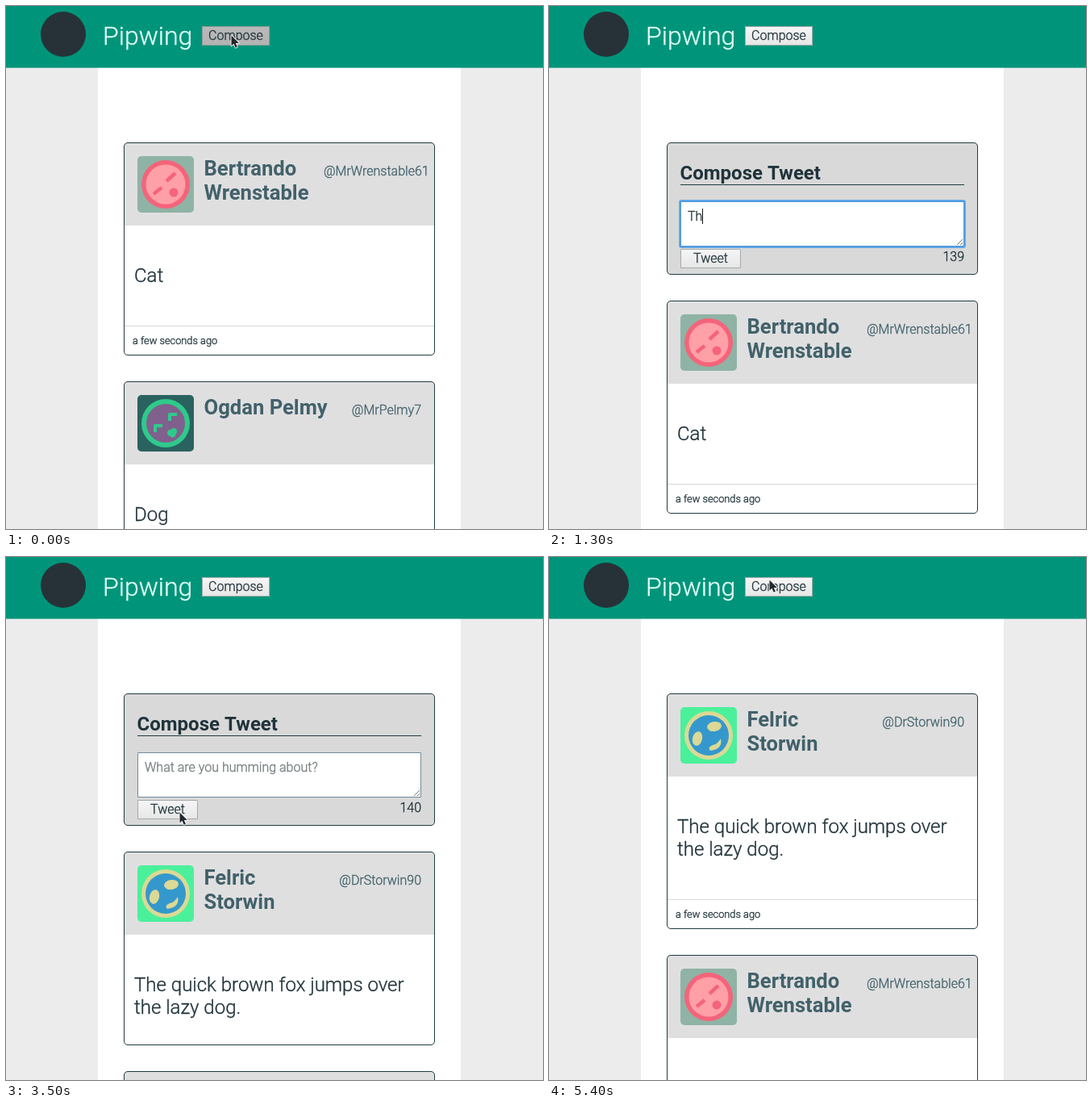
An HTML page with a canvas that plays this animation: 666 by 648 pixels, repeating every 5900 ms.

```html
<!DOCTYPE html>
<html lang="en">
<head>
<meta charset="utf-8">
<title>Compose and post</title>
<style>
  html, body { margin: 0; width: 100%; height: 100%; overflow: hidden; background: #ececec; }
  canvas { display: block; }
</style>
</head>
<body>
<canvas id="stage" width="666" height="648"></canvas>
<script>
const ctx = document.getElementById('stage').getContext('2d');
const LOOP = 5900, STEP = 100, LAST_STEP = 5400;
const SLIDE = 640, OPEN_AT = 35, POST_AT = 3037, CLOSE_AT = 4649;
const FOCUS_AT = 700, TYPE_AT = 1200, TYPED_AT = 2500, BLUR_AT = 2900;
const INK = '#20333a', DIM = '#42616a', EDGE = '#1f3c42';
const LEFT = 146, WIDTH = 386, GAP = 32, TOP = 169, COMPOSE_H = 164;
const MESSAGE = 'The quick brown fox jumps over the lazy dog.';

const cards = {
  fox: { avatar: globe, name: ['Felric', 'Storwin'], handle: '@DrStorwin90',
         body: ['The quick brown fox jumps over', 'the lazy dog.'], height: 292 },
  cat: { avatar: rose, name: ['Bertrando', 'Wrenstable'], handle: '@MrWrenstable61', handleX: 394,
         body: ['Cat'], height: 264 },
  dog: { avatar: emerald, name: ['Ogdan Pelmy'], handle: '@MrPelmy7',
         body: ['Dog'], height: 264 }
};

// time, x, y
const pointerPath = [
  [0, 279, 36], [2500, 279, 36], [2800, 220, 321], [3100, 215, 316],
  [3700, 215, 316], [4400, 273, 28], [LOOP, 273, 28]
];

const clamp = (v, lo, hi) => Math.min(hi, Math.max(lo, v));
const swing = u => 0.5 - Math.cos(Math.PI * clamp(u, 0, 1)) / 2;
const slide = (t, start) => swing((t - start) / SLIDE);

function text(str, x, y, size, color = INK, weight = 300, align = 'left') {
  ctx.font = `${weight} ${size}px Roboto, sans-serif`;
  ctx.fillStyle = ctx.strokeStyle = color;
  ctx.textAlign = align;
  ctx.fillText(str, x, y);
  // A hairline stroke gives light text the fuller look of smoothed type.
  if (weight === 300) {
    ctx.lineWidth = 0.35;
    ctx.lineJoin = 'round';
    ctx.strokeText(str, x, y);
  }
}

function rect(x, y, w, h, color) {
  ctx.fillStyle = color;
  ctx.fillRect(x, y, w, h);
}

function frame(x, y, w, h, color) {
  ctx.strokeStyle = color;
  ctx.lineWidth = 1;
  ctx.strokeRect(x + 0.5, y + 0.5, w - 1, h - 1);
}

function disc(x, y, rx, color, ry = rx, turn = 0) {
  ctx.fillStyle = color;
  ctx.beginPath();
  ctx.ellipse(x, y, rx, ry, turn, 0, Math.PI * 2);
  ctx.fill();
}

function polyline(points, color, width) {
  ctx.strokeStyle = color;
  ctx.lineWidth = width;
  ctx.beginPath();
  points.forEach(([x, y]) => ctx.lineTo(x, y));
  ctx.stroke();
}

function polygon(points, color) {
  ctx.fillStyle = color;
  ctx.beginPath();
  points.forEach(([x, y]) => ctx.lineTo(x, y));
  ctx.closePath();
  ctx.fill();
}

function rounded(x, y, w, h, r) {
  ctx.beginPath();
  ctx.roundRect(x, y, w, h, r);
}

// A rounded, outlined box whose content is clipped to its current height.
function panel(y, h, fill, content) {
  if (h < 1) return;
  ctx.save();
  rounded(LEFT, y, WIDTH, h, 5);
  ctx.clip();
  rect(LEFT, y, WIDTH, h, fill);
  content();
  ctx.restore();
  rounded(LEFT + 0.5, y + 0.5, WIDTH - 1, h - 1, 4.5);
  ctx.strokeStyle = EDGE;
  ctx.lineWidth = 1;
  ctx.stroke();
}

function badge(back, ring, inner, innerRadius) {
  ctx.fillStyle = back;
  rounded(-35, -35, 70, 70, 5);
  ctx.fill();
  disc(0, 0, 30, ring);
  disc(0, 0, innerRadius, inner);
}

function rose() {
  const pink = '#f4647b';
  badge('#8fb3a5', pink, '#ff9fa6', 24.5);
  polyline([[1, -4], [12, -14]], pink, 4.5);
  polyline([[-15, 12], [-5, 4]], pink, 4.5);
  disc(10, 10, 5.5, pink);
}

function emerald() {
  const green = '#2fca8b';
  badge('#2a625f', green, '#80608c', 24);
  polyline([[5, -3], [5, -11], [14, -11]], green, 4);
  polyline([[-13, 11], [-13, 3], [-4, 3]], green, 4);
  disc(6, 12, 4, green);
  disc(10, 10, 4, green);
  polygon([[3, 14], [13, 8], [12, 16], [8, 18]], green);
}

function globe() {
  const cream = '#dbd995';
  badge('#4bf09b', cream, '#3598cc', 25);
  disc(7, -11, 9, cream, 6, -0.15);
  disc(-14, 4, 6, cream, 9, 0.25);
  ctx.fillStyle = cream;
  ctx.beginPath();
  ctx.moveTo(15, 4);
  ctx.quadraticCurveTo(18, 17, 2, 19);
  ctx.quadraticCurveTo(-2, 15, 5, 12);
  ctx.quadraticCurveTo(11, 11, 15, 4);
  ctx.fill();
}

function drawCard(card, y, h = card.height) {
  panel(y, h, '#fff', () => {
    rect(LEFT, y, WIDTH, 103, '#dfdfe0');
    ctx.save();
    ctx.translate(198, y + 52);
    card.avatar();
    ctx.restore();
    card.name.forEach((line, i) => text(line, 245.5, y + 41 + i * 30, 25.6, DIM, 700));
    if (card.handleX) text(card.handle, card.handleX, y + 41, 16, DIM);
    else text(card.handle, 515, y + 41, 16, DIM, 300, 'right');
    card.body.forEach((line, i) => text(line, 159, y + 173 + i * 28, 24));
    rect(LEFT, y + card.height - 37, WIDTH, 1, '#d5d9da');
    text('a few seconds ago', 157, y + card.height - 14, 12.8);
  });
  return y + h + GAP;
}

function drawButton(label, x, y, w, h, pressed) {
  const shade = ctx.createLinearGradient(0, y, 0, y + h);
  shade.addColorStop(0, pressed ? '#b9b9b9' : '#f6f6f6');
  shade.addColorStop(1, pressed ? '#b3b3b3' : '#e6e6e6');
  rect(x, y, w, h, shade);
  frame(x, y, w, h, pressed ? '#8f9c98' : '#a3aaab');
  text(label, x + w / 2, y + 17, 16, INK, 300, 'center');
}

function drawField(t, y) {
  const count = t < TYPE_AT || t >= POST_AT ? 0
    : clamp(Math.round(2 + (t - 1300) * 0.035), 1, MESSAGE.length);
  const focused = t >= FOCUS_AT && t < BLUR_AT;
  const typed = MESSAGE.slice(0, count);

  rect(163, y, 352, 56, '#fff');
  frame(163, y, 352, 56, '#718a99');
  if (focused) {
    ctx.strokeStyle = '#4d9fe9';
    ctx.lineWidth = 2.5;
    rounded(162.5, y - 0.5, 353, 57, 1.5);
    ctx.stroke();
  }
  polyline([[506, y + 54], [513, y + 47]], '#777', 1);
  polyline([[510, y + 54], [513, y + 51]], '#777', 1);

  text(typed || 'What are you humming about?', 172, y + 24, 16, typed ? INK : '#747b7e');
  if (focused && t < TYPED_AT + 200) {
    const caret = 172 + (typed ? ctx.measureText(typed).width : 0);
    rect(Math.round(caret), y + 9, 1, 19, '#111');
  }
  // The counter trails the text by one key while typing.
  const counted = t < TYPED_AT ? Math.max(0, count - 1) : count;
  text(140 - counted, 515, y + 74, 16, INK, 300, 'right');
}

function drawCompose(t, open) {
  const y = Math.floor(TOP - GAP * (1 - open));
  const inner = y - Math.round(3.2 * (1 - open));
  panel(y, Math.round(COMPOSE_H * open), '#d9d9d9', () => {
    text('Compose Tweet', 162.5, inner + 46, 24, '#20333a', 700);
    rect(163, inner + 52, 352, 1, EDGE);
    drawField(t, inner + 73);
    drawButton('Tweet', 163, inner + 132, 75, 24, t >= BLUR_AT && t < POST_AT);
  });
}

function drawPointer(t) {
  if (t >= TYPE_AT && t <= TYPED_AT) return;
  const i = pointerPath.findIndex(p => p[0] > t);
  const [t0, x0, y0] = pointerPath[i - 1], [t1, x1, y1] = pointerPath[i];
  const u = swing((t - t0) / (t1 - t0));
  ctx.save();
  ctx.translate(x0 + (x1 - x0) * u, y0 + (y1 - y0) * u);
  const arrow = [[0.5, 0.5], [0.5, 13.5], [3.5, 10.8], [5.6, 15.8], [7.9, 14.8], [5.8, 9.9], [9.9, 9.9]];
  ctx.lineJoin = 'round';
  polyline([...arrow, arrow[0]], '#fff', 1.6);
  polygon(arrow, '#22292c');
  ctx.restore();
}

function drawHeader(t) {
  rect(0, 0, 666, 76.6, '#00957a');
  disc(71, 35, 28, '#263238');
  text('Pipwing', 120, 48, 32, '#e4fff9');
  drawButton('Compose', 243, 25, 84, 24, t < OPEN_AT || (t >= 4500 && t < CLOSE_AT));
}

function draw(t) {
  rect(0, 0, 666, 648, '#ececec');
  rect(114, 76, 450, 572, '#fff');

  const open = slide(t, OPEN_AT) - slide(t, CLOSE_AT);
  drawCompose(t, open);
  let y = Math.round(TOP + (COMPOSE_H + GAP) * open);
  const grown = slide(t, POST_AT);
  if (grown > 0) y = drawCard(cards.fox, y, Math.round(cards.fox.height * grown));
  y = drawCard(cards.cat, y);
  drawCard(cards.dog, y);

  drawHeader(t);
  drawPointer(t);
}

function tick() {
  const t = performance.now() % LOOP;
  draw(Math.min(LAST_STEP, Math.floor(t / STEP) * STEP));
  requestAnimationFrame(tick);
}
tick();
</script>
</body>
</html>
```
